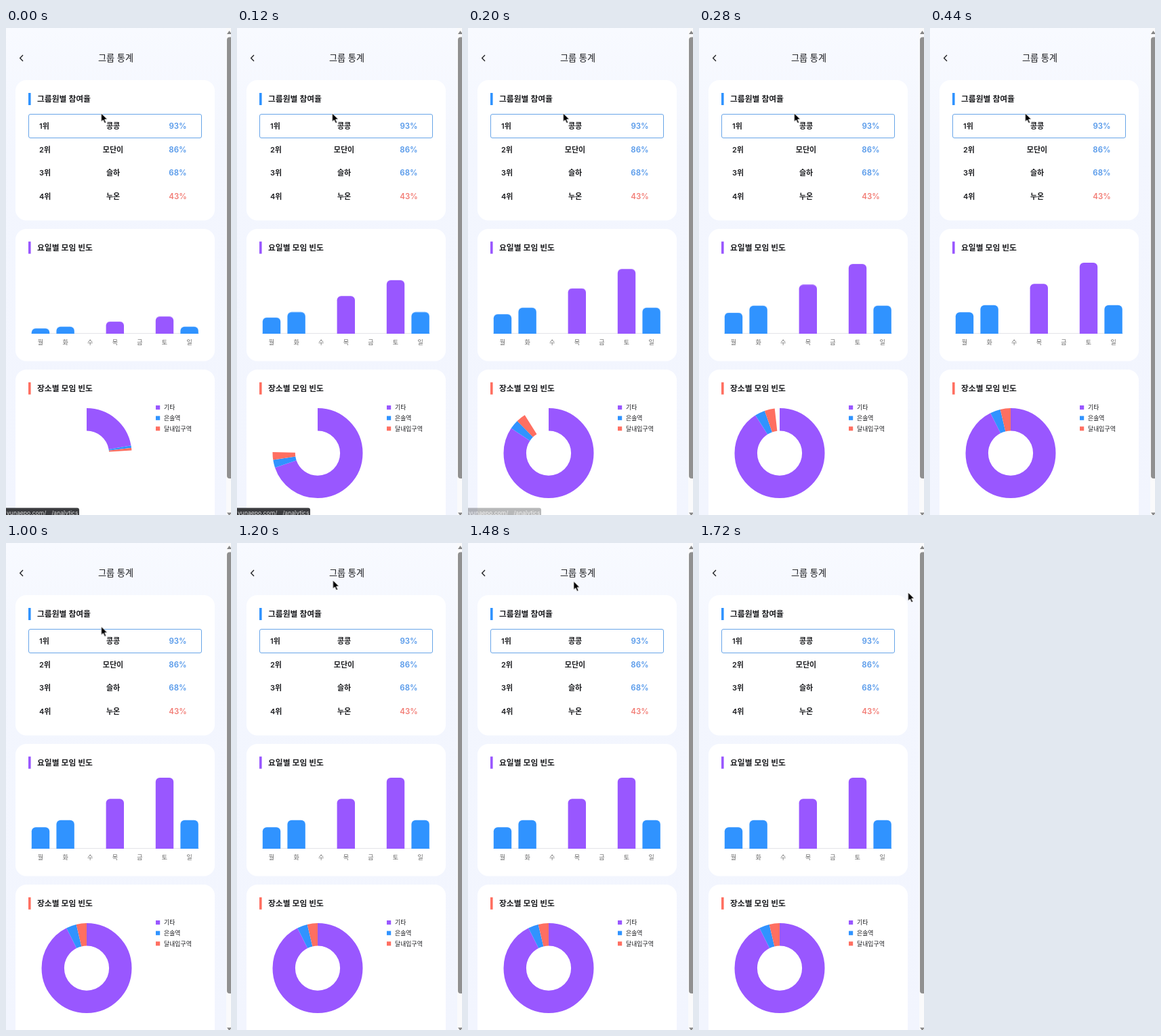
An HTML page that plays this animation: 332 px wide and 720 px high, repeating every 1880 ms.

```html
<!DOCTYPE html>
<html lang="ko">
<head>
<meta charset="utf-8">
<title>그룹 통계</title>
<style>
  :root { --blue: #3093ff; --purple: #9957ff; --red: #ff6f61; }
  html, body { margin: 0; width: 100%; height: 100%; overflow: hidden; }
  svg { display: block; width: 332px; height: 720px; }
  text { font: 600 11px Inter, "Noto Sans CJK KR", "Noto Sans CJK", sans-serif; fill: #1c1d20; }
  .mid { text-anchor: middle; }
  .title { font-size: 13.2px; font-weight: 500; }
  .head { font-size: 11.8px; }
  .rate { font-size: 11.5px; }
  .day { font-size: 9px; font-weight: 500; fill: #666; }
  .key { font-size: 8.9px; font-weight: 500; }

  .bar, .slice, .cursor, .status { animation: 1880ms linear infinite; }
  .bar { animation-name: grow; }
  .slice { animation-name: sweep; fill: none; stroke-width: 33.4; }
  .cursor { animation-name: move; }
  .status { animation-name: hide; }

  /* The charts are already 23.5% drawn when the loop begins. */
  @keyframes grow {
    0% { transform: translateY(calc(var(--h) * .765)); animation-timing-function: cubic-bezier(.164, .39, .347, 1); }
    18.88%, 100% { transform: translateY(0px); }
  }
  @keyframes sweep {
    0% {
      stroke-dasharray: calc(var(--n) * .235) 27px;
      stroke-dashoffset: calc(var(--o) * -.235);
      animation-timing-function: cubic-bezier(.164, .39, .347, 1);
    }
    18.88%, 100% { stroke-dasharray: var(--n) 27px; stroke-dashoffset: calc(var(--o) * -1); }
  }
  @keyframes move {
    0%, 51.06% { transform: translate(140.5px, 126px); }
    53.19% { transform: translate(140.5px, 123.5px); animation-timing-function: ease-in-out; }
    63.83%, 75.5% { transform: translate(141.5px, 55px); animation-timing-function: ease-in-out; }
    91.49%, 100% { transform: translate(308.5px, 73px); }
  }
  @keyframes hide {
    0%, 7% { opacity: 1; }
    12.8%, 100% { opacity: 0; }
  }
</style>
</head>
<body>
<svg viewBox="0 0 332 720">
  <defs>
    <linearGradient id="sky" x2="0" y2="1">
      <stop stop-color="#f8faff"/>
      <stop offset=".25" stop-color="#f3f6fe"/>
      <stop offset="1" stop-color="#f2f5fe"/>
    </linearGradient>
    <clipPath id="plot"><rect x="30" y="340" width="270" height="111.5"/></clipPath>
  </defs>
  <rect width="332" height="720" fill="url(#sky)"/>

  <path d="M25 40L20.7 44.5L25 49" fill="none" stroke="#25262a" stroke-width="1.4"/>
  <text class="title mid" x="162" y="49">그룹 통계</text>

  <g fill="#fff">
    <rect x="14" y="77" width="294" height="207.5" rx="16"/>
    <rect x="14" y="297" width="294" height="195.5" rx="16"/>
    <rect x="14" y="505" width="294" height="240" rx="16"/>
  </g>
  <rect x="33.5" y="127.5" width="255" height="35" rx="2.5" fill="#fff" stroke="#68a5e8"/>
  <g id="heads"></g>
  <g id="ranks"></g>

  <path d="M37 451.5H285" stroke="#e4e4e8"/>
  <g id="bars" clip-path="url(#plot)"></g>
  <g id="days"></g>

  <g id="pie" transform="translate(119 628.6) rotate(-90)"></g>
  <g id="keys"></g>

  <rect x="325" width="7" height="720" fill="#fafafb"/>
  <rect x="326" y="13.5" width="10" height="652.5" rx="4" fill="#909090"/>
  <path d="M326 9L329.5 4L333 9ZM326 716.5H333L329.5 721Z" fill="#858585"/>

  <g class="status">
    <path d="M0 709.5H105Q108 709.5 108 712.5V720H0Z" fill="#3b3c3f"/>
    <text x="1" y="720" style="font-size:8.6px;font-weight:400;fill:#dcdcdc">vunaepo.com/__/analytics</text>
  </g>
  <path class="cursor" d="M0 0V12.6L2.9 9.9L5 14.8L7.2 13.8L5.1 9.1H9Z" fill="#000" stroke="#fff" stroke-width=".8"/>
</svg>
<script>
  const fill = (id, items, draw) =>
    document.getElementById(id).innerHTML = items.map(draw).join('');
  const color = name => `var(--${name})`;
  const dayX = i => 51 + 36.6 * i;

  fill('heads', [
    [105, 'blue', '그룹원별 참여율'],
    [324.7, 'purple', '요일별 모임 빈도'],
    [532.8, 'red', '장소별 모임 빈도']
  ], ([y, c, label]) => `
    <rect x="33" y="${y - 9}" width="3.6" height="18" style="fill:${color(c)}"/>
    <text class="head" x="46" y="${y + 4}">${label}</text>`);

  fill('ranks', [['콩콩', 93], ['모단이', 86], ['슬하', 68], ['누온', 43]], ([name, rate], i) => {
    const y = 149.2 + 34.5 * i;
    return `
      <text x="49" y="${y}">${i + 1}위</text>
      <text class="mid" x="158" y="${y}">${name}</text>
      <text class="rate mid" x="253.5" y="${y}" style="fill:${rate < 50 ? '#f27d76' : '#5699ea'}">${rate}%</text>`;
  });

  // Weekday index, height, colour
  fill('bars', [
    [0, 31.3, 'blue'], [1, 41.8, 'blue'], [3, 73.2, 'purple'], [5, 104.6, 'purple'], [6, 41.8, 'blue']
  ], ([i, h, c]) => `
    <rect class="bar" x="${dayX(i) - 13.2}" y="${451.5 - h}" width="26.4" height="${h + 10}" rx="6"
      style="--h:${h}px;fill:${color(c)}"/>`);

  fill('days', [...'월화수목금토일'], (day, i) =>
    `<text class="day mid" x="${dayX(i)}" y="467.6">${day}</text>`);

  // Share and start, in parts of 27
  fill('pie', [[25, 0, 'purple'], [1, 25, 'blue'], [1, 26, 'red']], ([n, o, c]) => `
    <circle class="slice" r="49.8" pathLength="27" style="--n:${n}px;--o:${o}px;stroke:${color(c)}"/>`);

  fill('keys', [['기타', 'purple'], ['은솔역', 'blue'], ['달내입구역', 'red']], ([label, c], i) => {
    const y = 561 + 15.6 * i;
    return `
      <rect x="221" y="${y - 3}" width="6.2" height="6.2" style="fill:${color(c)}"/>
      <text class="key" x="233" y="${y + 3.4}">${label}</text>`;
  });
</script>
</body>
</html>
```
